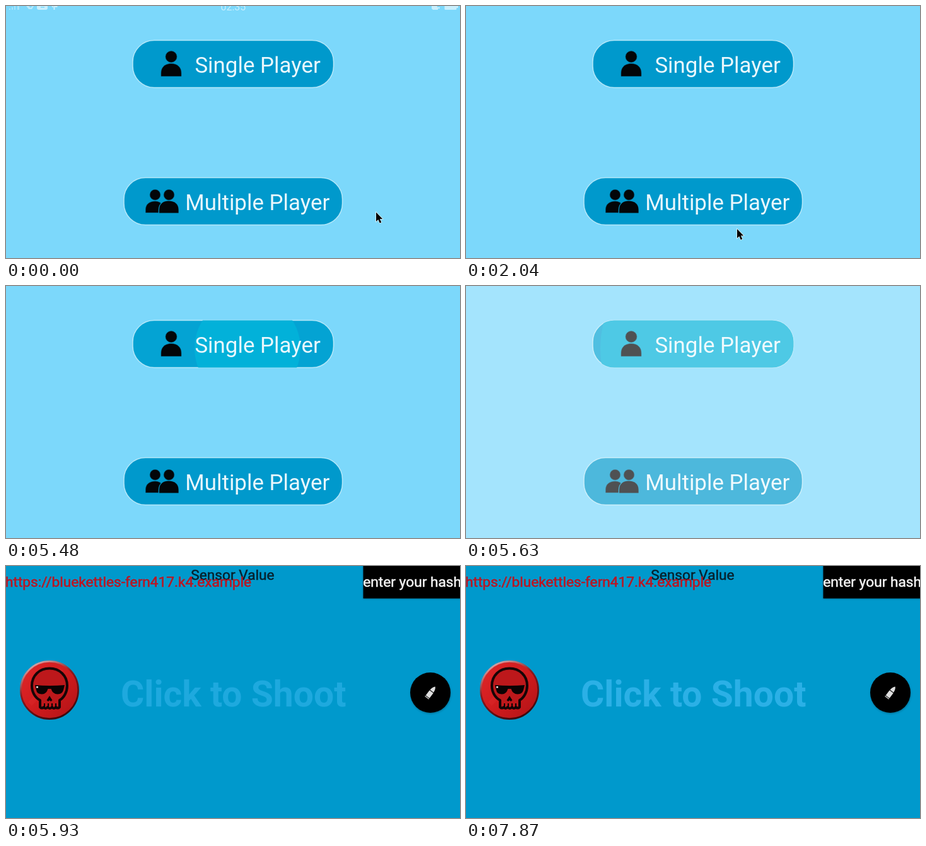
Write an HTML page that moves like this. It is 720x400 px and loops after 8 s.

```html
<!DOCTYPE html>
<html lang="en">
<head>
<meta charset="utf-8">
<title>Shooter menu</title>
<style>
  html, body { margin: 0; width: 100%; height: 100%; overflow: hidden; background: #7cd8fb; }
  svg { display: block; width: 720px; height: 400px; }
  text { font-family: Roboto, Arial, sans-serif; white-space: pre; }
  .label { font-size: 34.9px; fill: #e9f7fc; }
  .small { font-size: 22.7px; stroke-width: .5; }
  .button { fill: #0099cc; stroke: #b5e7f8; stroke-width: 1.5; }
  .person { fill: #030608; stroke: #04405a; stroke-opacity: .55; stroke-width: 1; }
</style>
</head>
<body>
<svg viewBox="0 0 720 400">
  <defs>
    <clipPath id="singleClip"><rect x="201" y="54.5" width="318.5" height="75" rx="34"/></clipPath>
    <linearGradient id="badge" x1="0" y1="0" x2="1" y2="1">
      <stop offset="0" stop-color="#e0282a"/>
      <stop offset=".5" stop-color="#d01c1e"/>
      <stop offset="1" stop-color="#b01216"/>
    </linearGradient>
    <linearGradient id="rim" x1=".2" y1="0" x2=".7" y2="1">
      <stop offset="0" stop-color="#e0b5b8"/>
      <stop offset=".4" stop-color="#8e1a1e"/>
      <stop offset="1" stop-color="#3a080d"/>
    </linearGradient>
    <filter id="soft" x="-20%" y="-20%" width="140%" height="140%"><feGaussianBlur stdDeviation="1.6"/></filter>
  </defs>

  <g id="menu">
    <rect width="720" height="400" fill="#7cd8fb"/>
    <g id="status" fill="#c9effd">
      <path d="M5 4h2v2h-2zM9 2h2v4h-2zM13 0h2v6h-2zM18 0h3v6h-3z" opacity=".55"/>
      <path d="M32 0h4l3 3 3-3h2l-3 5h-5z" opacity=".8"/>
      <rect x="49" y="-6" width="17" height="12" rx="3"/>
      <path d="M55 2h6" stroke="#7cd8fb" stroke-width="1.5"/>
      <path d="M75.5-2v8h2v-4h4v-3h-4v-1zM72 0h3v3z"/>
      <text x="340.5" y="6.5" font-size="16">02:35</text>
      <path d="M675-2h8l1 4h4v2h-3v2h-8l-2-2z"/>
      <rect x="695.5" y="-5" width="19" height="11" rx="1.5"/>
      <rect x="714" y="-2" width="3" height="5"/>
    </g>

    <rect id="single" class="button" x="201" y="54.5" width="318.5" height="75" rx="34"/>
    <g clip-path="url(#singleClip)"><circle id="ripple" cx="383" cy="99" fill="#02b1d9"/></g>
    <g class="person">
      <circle cx="262" cy="80.5" r="9"/>
      <path d="M246 111.5v-5c0-9 6-15 16-15s16 6 16 15v5z"/>
    </g>
    <text class="label" x="299.4" y="105.8">Single Player</text>

    <rect class="button" x="187" y="272.5" width="346.5" height="75" rx="34"/>
    <g class="person">
      <circle cx="236.5" cy="299.7" r="8.3"/>
      <path d="M221.5 328v-5c0-8 6-13 15-13 5 0 8 2 10 4l-4 14z"/>
      <path d="M243 328.5v-5c0-9 6-14 15.3-14s15.3 5 15.3 14v5z" stroke="#0099cc" stroke-opacity="1" stroke-width="2.5" paint-order="stroke"/>
      <circle cx="258.5" cy="299.7" r="8.3"/>
    </g>
    <text class="label" x="284.3" y="323.8">Multiple Player</text>

    <path id="cursor" d="M0 0V14.5L3.3 11.4 5.7 17 8.3 15.9 5.9 10.5H10.2Z" fill="#000" stroke="#fff" stroke-width="1.2" paint-order="stroke"/>
  </g>

  <g id="game">
    <rect width="720" height="400" fill="#0099cc"/>
    <text class="small" x="293.3" y="21.5" fill="#06222e" stroke="#06222e">Sensor Value</text>
    <text class="small" x="-1" y="33" fill="#bd1420" stroke="#bd1420">https://bluekettles-fern417.k4.example</text>
    <rect x="566.5" y="-2" width="158" height="54" fill="#00364a" opacity=".4" filter="url(#soft)"/>
    <rect x="566.5" width="153.5" height="51.5"/>
    <text class="small" x="566.3" y="33" fill="#f6f6f6" stroke="#f6f6f6">enter your hash</text>

    <circle cx="69" cy="197" r="45.6" fill="url(#badge)" stroke="url(#rim)" stroke-width="2.6"/>
    <path d="M38 219L88 164" stroke="#ee4444" stroke-width="8" opacity=".15"/>
    <path d="M54 224V213C46 209 41 200 41 190 41 174 53 162.5 69 162.5S97 174 97 190C97 200 92 209 85 213V224Q82 227 79 224 76 228 73 224 69.500 228 66 224 62.500 228 60 224 57 227 54 224Z" fill="#bd181b" stroke="#160506" stroke-width="4" stroke-linejoin="round"/>
    <g fill="#0b0304">
      <path d="M46 189Q69 191 93 189L91 197Q89 203.500 82 203.500 74 203.500 71.500 195H66.500Q64 203.500 57 203.500 49 203.500 48 197Z"/>
      <path d="M69 206l4.500 7-2.500 2-2-2-2 2-2.500-2z"/>
      <path d="M60 218h2v7h-2zM66 218h2v7h-2zM72 218h2v7h-2zM78 218h2v7h-2z"/>
    </g>
    <path d="M48 191h3v2.500h-3z" fill="#f4dede"/>

    <circle cx="673.5" cy="202.5" r="32" fill="#003a50" opacity=".4" filter="url(#soft)"/>
    <circle cx="673" cy="201" r="32"/>
    <g transform="translate(673.5 201) rotate(37) scale(.87 1)" fill="#dedede">
      <path d="M-4 -3Q-3.500 -9 0 -12 3.500 -9 4 -3Z"/>
      <path d="M-4.300 -2H4.300V8H-4.300Z"/>
      <path d="M-4.500 9H4.500V10.500H-4.500Z" fill="#b5b5b5"/>
    </g>

    <text id="prompt" x="182" y="223.3" font-size="57" font-weight="700" fill="#2bb0e6">Click to Shoot</text>
  </g>

  <rect id="flash" width="720" height="400" fill="#fff"/>
</svg>
<script>
  const LOOP = 8000;
  const el = Object.fromEntries([...document.querySelectorAll("svg [id]")].map(e => [e.id, e]));

  // Each row is [start time, ...values], held until the next row.
  const cursorPath = [
    [0, 587, 327.5], [1020, 587, 323], [1170, 587, 319], [1310, 589, 319.5],
    [1610, 575, 324], [1760, 520, 337], [1900, 430, 354],
    [2050, 330, 374], [2200, 241, 392], [2340, 241, 430]
  ];
  const ripplePath = [[0, 0], [5480, 84], [5630, 170]];
  const flashPath = [[0, 0], [5630, .3], [5780, .14], [5930, 0]];
  const promptPath = [[0, 0], [5930, .7], [6080, .85], [6230, 1]];

  const held = (rows, t) => rows.findLast(row => row[0] <= t).slice(1);
  const show = (node, on) => node.setAttribute("visibility", on ? "visible" : "hidden");

  function render(t) {
    const playing = t >= 5780;
    show(el.menu, !playing);
    show(el.game, playing);
    el.status.setAttribute("opacity", t < 150 ? 1 : 0);
    el.cursor.setAttribute("transform", `translate(${held(cursorPath, t)})`);
    el.ripple.setAttribute("r", held(ripplePath, t)[0]);
    el.single.style.fill = t < 5480 ? "#0099cc" : "#04a3d3";
    el.flash.setAttribute("opacity", held(flashPath, t)[0]);
    el.prompt.setAttribute("opacity", held(promptPath, t)[0]);
  }

  const start = performance.now();
  function tick() {
    render((performance.now() - start) % LOOP);
    requestAnimationFrame(tick);
  }
  tick();
</script>
</body>
</html>
```
